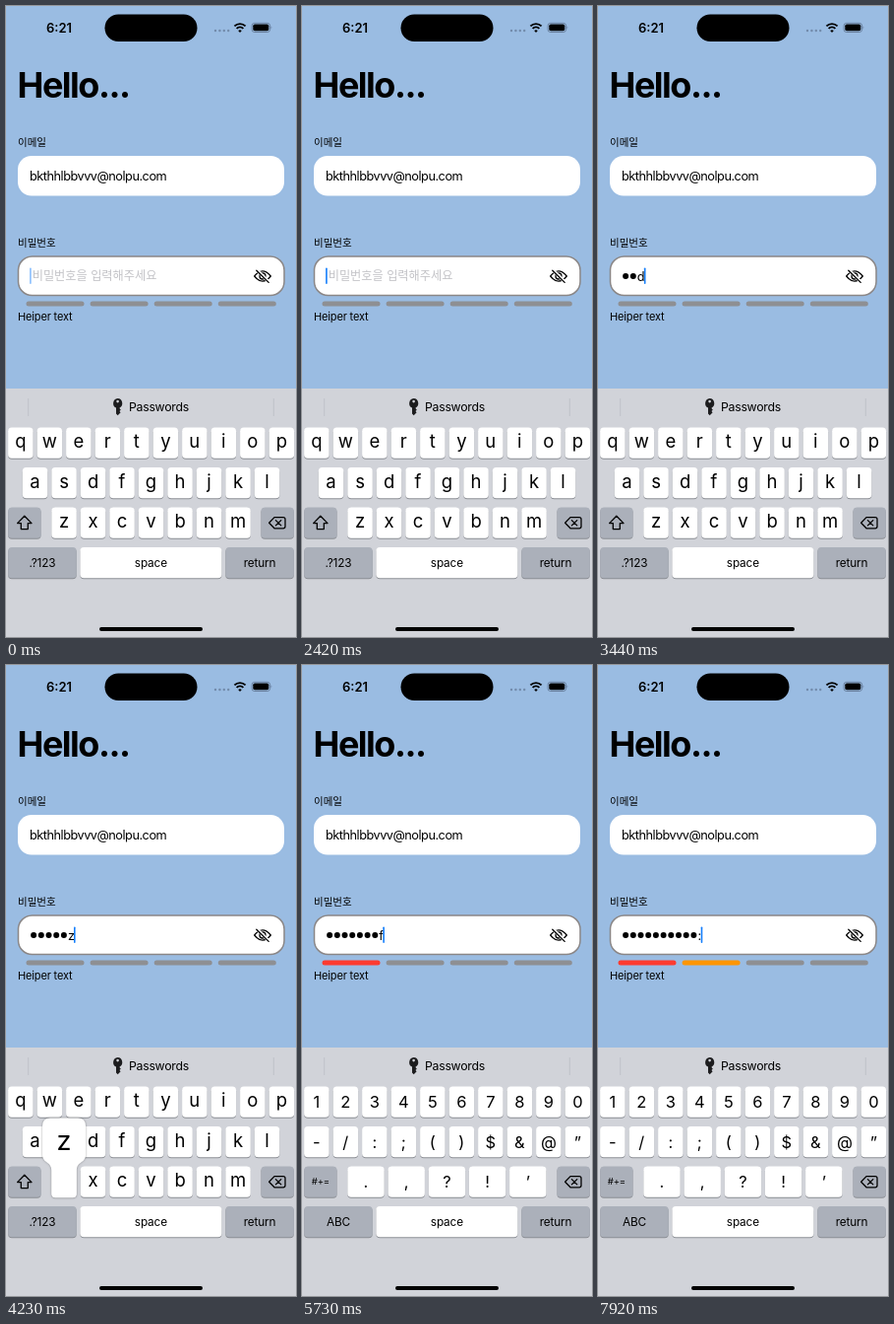
An HTML page that plays this animation: 295 px wide and 640 px high, repeating every 8 s.

```html
<!DOCTYPE html>
<html lang="ko">
<head>
<meta charset="utf-8">
<title>Login form</title>
<style>
  html, body { margin: 0; width: 100%; height: 100%; overflow: hidden; background: #9abce2; }
  svg { display: block; width: 100vw; height: 100vh; }
  text { font-family: Inter, Roboto, sans-serif; fill: #000; }
  .ko { font-family: "Noto Sans CJK KR", "Noto Sans CJK", "Noto Sans", sans-serif; }
  .mid { text-anchor: middle; }
  .field { font-size: 12.75px; letter-spacing: -.5px; }
  .line { fill: none; stroke: #000; stroke-width: 1.3; stroke-linecap: round; stroke-linejoin: round; }
</style>
</head>
<body>
<svg id="stage" viewBox="0 0 295 640" xmlns="http://www.w3.org/2000/svg">
  <rect width="295" height="640" fill="#9abce2"/>

  <!-- status bar -->
  <text x="54" y="26.5" class="mid" font-size="13" font-weight="600">6:21</text>
  <rect x="100.5" y="8.5" width="94" height="27.5" rx="13.75"/>
  <g fill="#728bab">
    <circle cx="213" cy="25" r="1.2"/><circle cx="217.4" cy="25" r="1.2"/>
    <circle cx="221.8" cy="25" r="1.2"/><circle cx="226.2" cy="25" r="1.2"/>
  </g>
  <g fill="none" stroke="#000" stroke-width="1.9">
    <path d="M232.4 20.4A8 8 0 0 1 243.6 20.4"/>
    <path d="M234.6 22.9A4.9 4.9 0 0 1 241.4 22.9"/>
  </g>
  <path d="M238 27L236.2 25A2.6 2.6 0 0 1 239.8 25Z"/>
  <rect x="250" y="17.3" width="18.6" height="9.2" rx="2.8" fill="none" stroke="#5f7390" stroke-width=".8"/>
  <rect x="251.3" y="18.6" width="16" height="6.6" rx="1.7"/>
  <path d="M269.6 20.3Q271 21.9 269.6 23.5Z" fill="#5f7390"/>

  <!-- form -->
  <text x="11.5" y="93" font-size="36" font-weight="700" letter-spacing="-1.5">Hello...</text>
  <text x="12" y="142" class="ko" font-size="10.5">이메일</text>
  <rect x="12" y="152" width="271" height="40.5" rx="14" fill="#fff"/>
  <text x="24" y="177" class="field">bkthhlbbvvv@nolpu.com</text>
  <text x="12" y="243.7" class="ko" font-size="10.5">비밀번호</text>
  <rect x="12.5" y="254" width="270.5" height="39.5" rx="14" fill="#fff" stroke="#8b8787" stroke-width="1.5"/>
  <text id="hint" x="26.7" y="278" class="ko" font-size="12.2" style="fill:#c3c3c7">비밀번호을 입력해주세요</text>
  <g id="dots"></g>
  <text id="last" y="278.6" class="field"></text>
  <rect id="caret" y="265.5" width="1.6" height="16.5" rx=".8" fill="#147efb"/>
  <g class="line">
    <path d="M252.7 274Q261 263.8 269.3 274Q261 284.2 252.7 274Z"/>
    <circle cx="261" cy="274" r="3"/>
    <path d="M255 267.6L267.6 280.2" stroke="#fff" stroke-width="3.2"/>
    <path d="M254.8 268.2L267.2 280.4"/>
  </g>
  <g id="bars"></g>
  <text x="12" y="319.3" font-size="11" letter-spacing="-.15">Heiper text</text>

  <!-- keyboard -->
  <rect y="388" width="295" height="252" fill="#d1d3d9"/>
  <path d="M22.7 398V416M272.3 398V416" stroke="#bfc2c9" stroke-width="1"/>
  <g fill="#1c1c1e">
    <path fill-rule="evenodd" d="M113.6 398A5 5 0 0 1 115.6 407.4V408.3L116.8 409.6L115.5 411L116.6 412.3L113.7 415.3L112 413.6V407.5A5 5 0 0 1 113.6 398ZM113.6 399.8A1.3 1.3 0 0 0 113.6 402.4A1.3 1.3 0 0 0 113.6 399.8Z"/>
    <text x="125" y="411.2" font-size="12.3" letter-spacing="-.28">Passwords</text>
  </g>
  <g id="letters"></g>
  <g id="symbols"></g>
  <g id="shared"></g>
  <g id="popup">
    <path fill="#fff" style="filter:drop-shadow(0 .5px 1.2px rgba(0,0,0,.35))"/>
    <text class="mid" font-size="27"></text>
  </g>
  <rect x="95" y="630" width="105" height="3.9" rx="1.95"/>
</svg>
<script>
const NS = "http://www.w3.org/2000/svg";
const LOOP = 8000;
const $ = id => document.getElementById(id);

function add(parent, tag, attrs, text) {
  const el = document.createElementNS(NS, tag);
  for (const k in attrs) el.setAttribute(k, attrs[k]);
  if (text) el.textContent = text;
  parent.append(el);
  return el;
}

// Keyboard
const ROWS = [427.5, 468, 508.5, 549], KEY_H = 31.3;
const keyAt = {};

function cap(group, x, row, w, fill) {
  const y = ROWS[row];
  add(group, "rect", { x, y: y + 1, width: w, height: KEY_H, rx: 3.8, fill: "#8b8e94" });
  return add(group, "rect", { x, y, width: w, height: KEY_H, rx: 3.8, fill });
}

function keyRow(group, chars, row, x, pitch, w, size, base) {
  [...chars].forEach((ch, i) => {
    const left = x + i * pitch, mid = left + w / 2;
    cap(group, left, row, w, "#fff");
    add(group, "text", { x: mid, y: ROWS[row] + base, class: "mid", "font-size": size }, ch);
    keyAt[ch] = { x: mid, y: ROWS[row] };
  });
}

function wide(group, x, row, w, label, size, fill = "#abb0ba") {
  const rect = cap(group, x, row, w, fill);
  add(group, "text", { x: x + w / 2, y: ROWS[row] + 15.5 + size * .36, class: "mid",
    "font-size": size, "letter-spacing": -.15 }, label);
  return rect;
}

const letters = $("letters"), symbols = $("symbols"), shared = $("shared");
keyRow(letters, "qwertyuiop", 0, 2.1, 29.5, 25.5, 18.5, 20.5);
keyRow(letters, "asdfghjkl", 1, 16.8, 29.5, 25.5, 18.5, 20.5);
keyRow(letters, "zxcvbnm", 2, 46.3, 29.5, 25.5, 18.5, 20.5);
wide(letters, 2.2, 3, 69.5, ".?123", 11.8);
cap(letters, 2.2, 2, 33.3, "#abb0ba");
add(letters, "path", { class: "line", d: "M18.8 517.3L26 524.6H22.3V530.6H15.3V524.6H11.6Z" });

keyRow(symbols, "1234567890", 0, 2.1, 29.5, 25.5, 16.5, 21.8);
keyRow(symbols, "-/:;()$&@”", 1, 2.1, 29.5, 25.5, 16.5, 21.5);
keyRow(symbols, ".,?!’", 2, 46.3, 41.2, 37.4, 16.5, 21.5);
wide(symbols, 2.2, 2, 33.3, "#+=", 9.5);
const modeKey = wide(symbols, 2.2, 3, 69.5, "ABC", 11.8);

wide(shared, 75.4, 3, 144, "space", 11.8, "#fff");
wide(shared, 223.3, 3, 69.5, "return", 11.8);
cap(shared, 259.5, 2, 33.3, "#abb0ba");
add(shared, "path", { class: "line",
  d: "M267.6 524.2L273 518.6H282Q284 518.6 284 520.6V527.8Q284 529.8 282 529.8H273ZM274.4 521.6L279.8 526.9M279.8 521.6L274.4 526.9" });

// Password field
const PITCH = 7.7, LEFT = 24.4;
const dots = [...Array(10)].map((_, i) =>
  add($("dots"), "circle", { cx: LEFT + 3.7 + i * PITCH, cy: 274, r: 3 }));
const bars = [0, 1, 2, 3].map(i =>
  add($("bars"), "rect", { x: 20.5 + i * 65.1, y: 299.5, width: 59, height: 5, rx: 2.5 }));
const BAR_ON = ["#ff3b30", "#ff9500"], BAR_AT = [8, 9];
const ADVANCE = { d: 7.4, z: 6.4, f: 4.3, 2: 7.3, ":": 3.6 };

// Timeline
const typed = "dddzzzff22:";
const typeTimes = [2590, 2880, 3240, 3700, 3850, 4230, 4620, 5100, 7010, 7170, 7920];
const presses = [
  ["d", 2460, 2590], ["d", 2740, 2880], ["d", 3080, 3240], ["z", 3550, 3700],
  ["z", 4230, 4470], ["f", 4470, 4620], ["f", 4950, 5100],
  ["2", 6620, 7010], ["2", 7170, 7610], [":", 7610, 7920]
];
const blink = [
  [0, .5], [270, 0], [660, .25], [780, .5], [900, .8], [1020, 1],
  [1560, 1], [1680, .6], [1800, .25], [1920, 0], [2200, .5], [2330, 1],
  [6220, .6], [6350, .2], [6490, 0], [6620, 1]
];
const SWITCH = 5590, SWITCH_UP = 5730;

const show = (el, on) => el.setAttribute("visibility", on ? "visible" : "hidden");

function drawPopup(press) {
  const g = $("popup");
  show(g, press);
  if (!press) return;
  const { x, y } = keyAt[press[0]];
  const [shape, label] = g.children;
  shape.setAttribute("d", `M${x - 22} ${y - 41}q0 -8 8 -8h28q8 0 8 8v29
    c0 9 -9.2 7 -9.2 16v24q0 4 -4 4h-17.6q-4 0 -4 -4v-24c0 -9 -9.2 -7 -9.2 -16z`);
  label.setAttribute("x", x);
  label.setAttribute("y", y - 17);
  label.textContent = press[0];
}

function draw(t) {
  const n = typeTimes.filter(at => at <= t).length;
  const ch = n ? typed[n - 1] : "";
  const lastX = LEFT + Math.max(0, n - 1) * PITCH;

  show($("hint"), !n);
  dots.forEach((dot, i) => show(dot, i < n - 1));
  $("last").textContent = ch;
  $("last").setAttribute("x", lastX);
  $("caret").setAttribute("x", lastX + (ADVANCE[ch] || 0) - .3);
  $("caret").setAttribute("opacity", blink.filter(b => b[0] <= t).pop()[1]);
  bars.forEach((bar, i) => bar.setAttribute("fill", n >= BAR_AT[i] ? BAR_ON[i] : "#8e8f93"));

  show(letters, t < SWITCH);
  show(symbols, t >= SWITCH);
  modeKey.setAttribute("fill", t < SWITCH_UP ? "#fff" : "#abb0ba");
  drawPopup(presses.find(p => t >= p[1] && t < p[2]));
}

const start = performance.now();
function tick(now) {
  draw(Math.max(0, now - start) % LOOP);
  requestAnimationFrame(tick);
}
draw(0);
requestAnimationFrame(tick);
</script>
</body>
</html>
```
